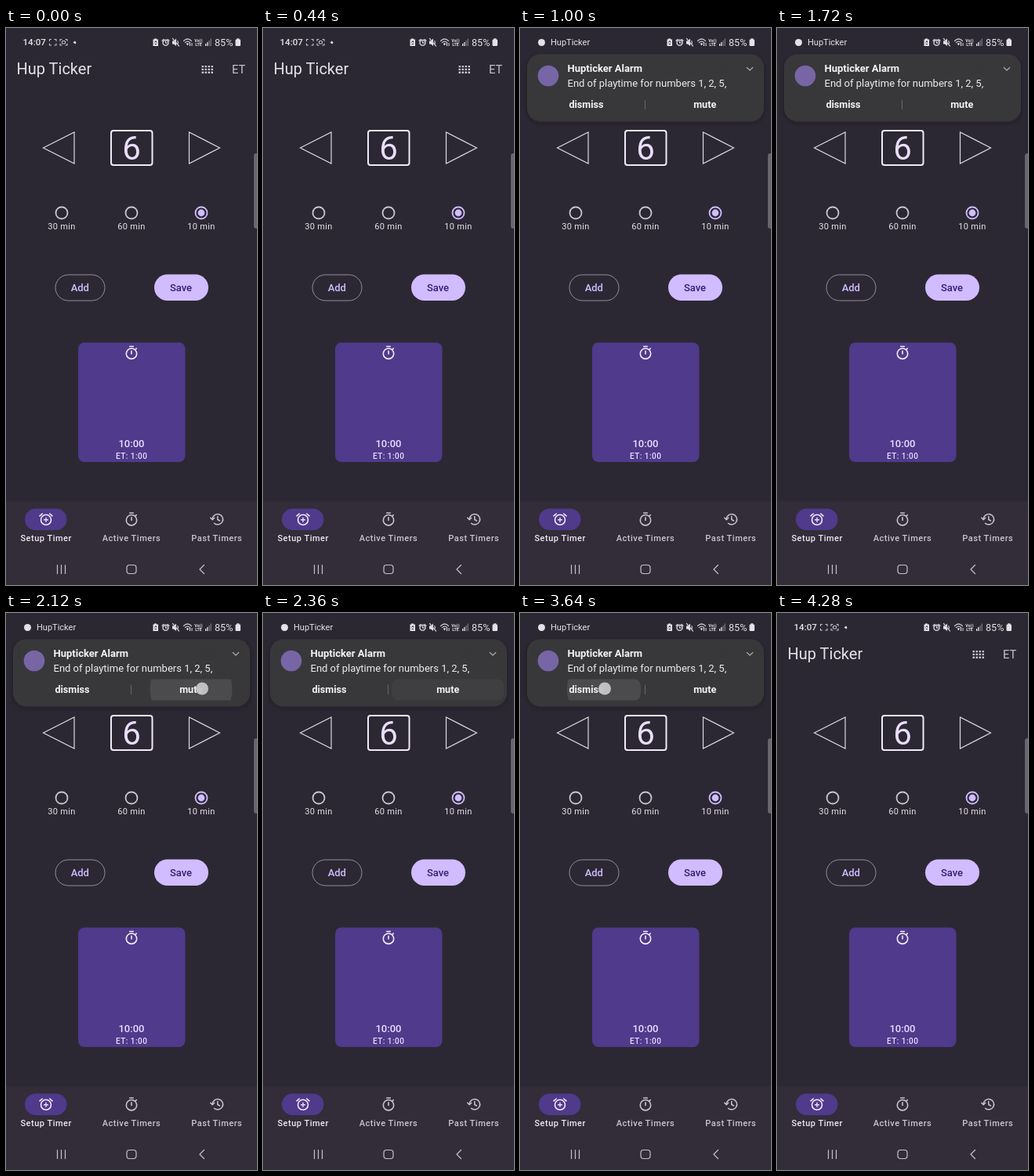
Animation, 320 px wide and 711 px high, one loop 4320 ms. Source, as an HTML page:

```html
<!DOCTYPE html>
<html lang="en">
<head>
<meta charset="utf-8">
<title>Timer alarm</title>
<style>
  html, body { margin: 0; width: 100%; height: 100%; overflow: hidden; background: #2c2833; }
  svg { display: block; width: 100%; height: 100%; font-family: Roboto, sans-serif; fill: #e6e1e8; }
  .line { fill: none; stroke: #cac4d0; stroke-linecap: round; stroke-linejoin: round; }
  .mid { text-anchor: middle; }
  .medium { font-weight: 500; }
  .bold { font-weight: 700; }
  .label { font-size: 11px; letter-spacing: .32px; }
  .tab { font-size: 11px; letter-spacing: .52px; font-weight: 500; fill: #cac4d0; }
  .action { font-size: 12.6px; font-weight: 700; fill: #f4f4f4; }
</style>
</head>
<body>
<svg viewBox="0 0 320 711" preserveAspectRatio="none">
  <defs>
    <g id="stopwatch" class="line" stroke-width="1.6">
      <circle cy="1.2" r="6.7"/>
      <path d="M-2.3 -8H2.3M0 -2.3V1.5M5 -4.2L6.2 -5.4"/>
    </g>
    <g id="alarm" class="line">
      <circle r="6.5"/>
      <path d="M-8 -5L-4.7 -7.8M8 -5L4.7 -7.8"/>
    </g>
    <clipPath id="dismissArea"><rect x="14" y="84.5" width="140" height="27" rx="8"/></clipPath>
    <clipPath id="muteArea"><rect x="164" y="84.5" width="143" height="27" rx="8"/></clipPath>
    <filter id="shade" x="-10%" y="-20%" width="120%" height="150%">
      <feDropShadow dx="0" dy="2" stdDeviation="3" flood-color="#17141c" flood-opacity=".35"/>
    </filter>
  </defs>

  <rect width="320" height="711" fill="#2c2833"/>
  <rect y="604.5" width="320" height="107" fill="#322d39"/>
  <rect x="316" y="160" width="8" height="96" rx="3" fill="#69656e"/>

  <!-- status bar -->
  <g id="clock">
    <text x="21.5" y="22" font-size="11.6" class="medium">14:07</text>
    <g class="line" stroke-width="1.1">
      <path d="M57.500 14.500H55.500V16.500M62 14.500H64V16.500M55.500 20V22H57.500M64 20V22H62"/>
      <path d="M71 14.500H69V16.500M76 14.500H78V16.500M69 20V22H71M78 20V22H76"/>
      <rect x="71.500" y="16.500" width="4" height="3.500" rx="1"/>
    </g>
    <path d="M85.500 18.500L88 16.500L89.500 18.500L88.500 20.500Z"/>
  </g>
  <g id="ticker">
    <circle cx="27.500" cy="18.500" r="4.500"/>
    <text x="39" y="22" font-size="11">HupTicker</text>
  </g>
  <path d="M189 13.500H192V14.500H194V23H187.500V14.500H189Z"/>
  <path d="M189.500 18.500L191 16.500L192 18.500M189.700 20.500H192" fill="none" stroke="#2c2833"/>
  <use href="#alarm" transform="translate(203.500 18.800) scale(.53)" stroke-width="3"/>
  <path class="line" stroke-width="1.300" d="M203.500 17V19H205"/>
  <path d="M212 16.500H214L217 13.500V23L214 20.500H212Z"/>
  <path class="line" stroke-width="1.200" d="M212.500 13.500L220.500 23M218.800 16.500Q220 18.500 218.800 20.500"/>
  <path class="line" stroke-width="1.200" d="M226.500 16.500Q231.500 11.500 236.500 16.500M228.300 18.600Q231.500 15.500 234.700 18.600"/>
  <path d="M229.700 20L231.500 22.300L233.300 20Q231.500 18.700 229.700 20Z"/>
  <path d="M234.500 19V23M237 19V23" stroke="#e6e1e8"/>
  <g class="mid bold" font-size="5.400">
    <text x="245.500" y="17.500">Vo))</text>
    <text x="245.500" y="23">LTE</text>
  </g>
  <path d="M254 20H255.300V23H254ZM256.200 18H257.500V23H256.200Z"/>
  <path d="M258.400 16H259.700V23H258.400ZM260.600 13.500H261.900V23H260.600Z" fill="#77727d"/>
  <text x="266" y="22.500" font-size="12.600">85%</text>
  <rect x="292.500" y="14.500" width="6.500" height="8.500" rx="1.200"/>
  <rect x="294.300" y="13.300" width="3" height="2"/>

  <!-- app bar -->
  <text x="13.500" y="59" font-size="20">Hup Ticker</text>
  <g id="dots" fill="#cac4d0"></g>
  <text x="288" y="57.500" font-size="14.600" fill="#cac4d0">ET</text>

  <!-- setup form -->
  <g class="line" stroke-width="1.200" style="stroke:#ddd8e2;stroke-linejoin:miter">
    <path d="M47.500 153L87 133V173Z"/>
    <path d="M272.500 153L233.500 133V173Z"/>
    <rect x="134" y="131" width="52.500" height="44" rx="3" stroke-width="2" stroke="#f0e8f8"/>
  </g>
  <text class="mid" x="160" y="168" font-size="42" fill="#eaddff">6</text>

  <g class="line" stroke-width="1.800">
    <circle cx="71" cy="236" r="7.500"/>
    <circle cx="160" cy="236" r="7.500"/>
    <circle cx="249" cy="236" r="7.500" style="stroke:#d0bcff"/>
  </g>
  <circle cx="249" cy="236" r="4.400" fill="#d0bcff"/>
  <g class="mid label">
    <text x="71" y="257">30 min</text>
    <text x="160" y="257">60 min</text>
    <text x="249" y="257">10 min</text>
  </g>

  <rect x="63" y="315" width="63" height="33" rx="16.500" fill="none" stroke="#938f99"/>
  <rect x="189" y="314.500" width="69" height="33.500" rx="16.700" fill="#d0bcff"/>
  <g class="mid medium" font-size="13">
    <text x="94.300" y="335.700" fill="#d0bcff">Add</text>
    <text x="223" y="335.700" fill="#381e72">Save</text>
  </g>

  <rect x="92" y="401.500" width="136.500" height="152.500" rx="8" fill="#4f3a8b"/>
  <use href="#stopwatch" x="160" y="414.500" style="filter:brightness(1.2)"/>
  <g class="mid medium" fill="#eaddff">
    <text x="160" y="534.500" font-size="13">10:00</text>
    <text x="160.200" y="550.300" font-size="10" letter-spacing=".45">ET: 1:00</text>
  </g>

  <!-- bottom navigation -->
  <rect x="24" y="613.500" width="53.500" height="27.500" rx="13.700" fill="#4f3a8b"/>
  <use href="#alarm" x="51" y="627.800" stroke-width="1.600" style="filter:brightness(1.2)"/>
  <path d="M51 624.800V630.800M48 627.800H54" stroke="#eaddff" stroke-width="1.500"/>
  <use href="#stopwatch" x="160" y="627"/>
  <path class="line" stroke-width="1.500" d="M263.200 627A6.700 6.700 0 1 1 265.500 632.200M260.800 625.300L263.200 627.800L265.700 625.300M269.800 623.500V627.500L272.500 629"/>
  <g class="mid tab">
    <text x="51.200" y="655" style="fill:#eee8f3">Setup Timer</text>
    <text x="160" y="655">Active Timers</text>
    <text x="268.800" y="655">Past Timers</text>
  </g>
  <g class="line" stroke-width="1.200" style="stroke:#c5c1c9">
    <path d="M65.500 685.500V696.500M70.500 685.500V696.500M75.500 685.500V696.500"/>
    <rect x="154" y="685.500" width="12" height="11" rx="3.500"/>
    <path d="M252.500 685.500L247 691L252.500 696.500"/>
  </g>

  <!-- heads-up alarm -->
  <g id="banner">
    <rect id="panel" x="9" y="33.500" width="302" height="54" rx="17" fill="#39383a" filter="url(#shade)"/>
    <g id="ghost" fill="#2d2c2f">
      <text x="13.500" y="59" font-size="20">Hup Ticker</text>
      <text x="288" y="57.500" font-size="14.600">ET</text>
      <path d="M249.500 49.500H264.500M249.500 53H264.500M249.500 56.500H264.500" stroke="#2d2c2f" stroke-width="2" stroke-dasharray="2.500 1.700"/>
    </g>
    <g id="content">
      <circle cx="36" cy="61" r="13.300" fill="#7765a5"/>
      <text x="60.500" y="56" font-size="13" class="bold" fill="#f5f5f5">Hupticker Alarm</text>
      <text x="60.500" y="75" font-size="13" fill="#ededed">End of playtime for numbers 1, 2, 5,</text>
      <path class="line" stroke-width="1.200" style="stroke:#aaa" d="M289.300 50.500L293 54L296.700 50.500"/>
      <circle id="dismissRipple" cx="107" cy="97" clip-path="url(#dismissArea)" fill="#4b4a4c"/>
      <circle id="muteRipple" cx="236" cy="97" clip-path="url(#muteArea)" fill="#4b4a4c"/>
      <path d="M159.500 91.500V104" stroke="#666568"/>
      <g class="mid action">
        <text x="84.500" y="102">dismiss</text>
        <text x="235.700" y="102">mute</text>
      </g>
    </g>
  </g>
  <circle id="touch" cy="96.500" r="8" fill="#c6c5c6"/>
</svg>
<script>
  const LOOP = 4320;
  const byId = id => document.getElementById(id);
  const set = (id, attrs) => {
    for (const [name, value] of Object.entries(attrs)) byId(id).setAttribute(name, value);
  };
  const ramp = (t, from, to) => {
    const p = Math.min(1, Math.max(0, (t - from) / (to - from)));
    return p * p * (3 - 2 * p);
  };
  const pulse = (t, inAt, inEnd, outAt, outEnd) => ramp(t, inAt, inEnd) - ramp(t, outAt, outEnd);

  let dots = '';
  for (let i = 0; i < 12; i++) {
    dots += `<rect x="${249.5 + (i % 4) * 4}" y="${48 + Math.floor(i / 4) * 3.8}" width="2.5" height="2.3" rx=".5"/>`;
  }
  byId('dots').innerHTML = dots;

  function draw(t) {
    const ticker = pulse(t, 520, 640, 3880, 4020);
    set('ticker', { opacity: ticker });
    set('clock', { opacity: 1 - ticker });

    const enter = ramp(t, 540, 670);
    const leave = ramp(t, 3720, 3900);
    const scale = 0.92 + 0.08 * enter;
    const lift = -14 * (1 - enter) - 26 * leave;
    set('banner', {
      opacity: enter * (1 - leave),
      transform: `translate(${160 * (1 - scale)} ${lift}) scale(${scale} 1)`
    });
    set('panel', { height: 54 + 31.5 * ramp(t, 690, 880) });
    set('ghost', { opacity: 0.75 - 0.6 * ramp(t, 720, 920) });
    set('content', { opacity: ramp(t, 740, 920) });

    set('muteRipple', { r: 80 * ramp(t, 2000, 2200), opacity: pulse(t, 2000, 2080, 2200, 2480) });
    set('dismissRipple', { r: 100 * ramp(t, 3540, 3750), opacity: pulse(t, 3530, 3600, 3740, 3900) });
    const muteTouch = pulse(t, 2000, 2030, 2160, 2200);
    const dismissTouch = pulse(t, 3530, 3560, 3680, 3720);
    set('touch', { cx: t < 2800 ? 250 : 108, opacity: 0.95 * (muteTouch + dismissTouch) });
  }

  const start = performance.now();
  function tick() {
    draw((performance.now() - start) % LOOP);
    requestAnimationFrame(tick);
  }
  draw(0);
  requestAnimationFrame(tick);
</script>
</body>
</html>
```
